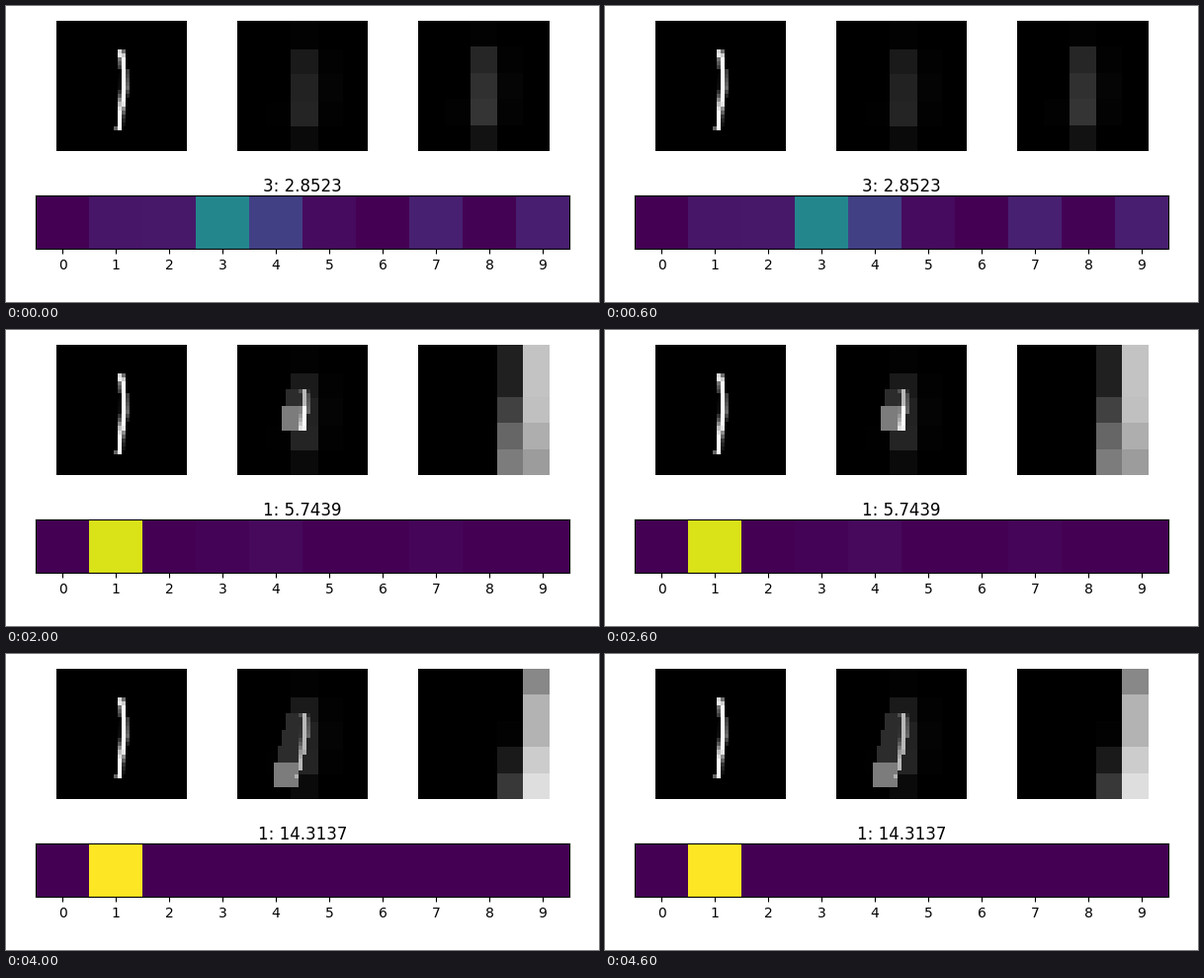
These frames come from a looping animation (600x300 px, 5 s). A matplotlib script:

```python
import numpy as np
import matplotlib.pyplot as plt
from matplotlib.animation import FuncAnimation

W, H = 600, 300
N = 32      # image cells per side
PATCH = 6   # glimpse size in image cells
STEPS = 5

plt.rcParams["font.family"] = "DejaVu Sans"


def stroke():
    """Handwritten one: each cell's brightness is its overlap with the stroke."""
    rows = np.arange(7, 27)
    left = np.interp(rows, [7, 8, 9, 11, 12, 16, 18, 20, 22, 25, 26],
                     [15.16, 15.08, 15.55, 15.75, 16, 15.95, 15.65, 15.25, 15, 15, 14.6])
    right = np.interp(rows, [7, 8, 9, 11, 12, 16, 19, 20, 21, 23, 26],
                      [16.43, 16.8, 17, 17, 17.25, 17.42, 17, 16.9, 16.55, 16.2, 16])
    col = np.arange(N)
    img = np.zeros((N, N))
    cover = np.minimum(right[:, None], col + 1) - np.maximum(left[:, None], col)
    img[rows] = 255 * cover.clip(0, 1)
    return img


def grid(**cols):
    """5x5 patch that is black except for the given columns."""
    out = np.zeros((5, 5))
    for name, values in cols.items():
        out[:, int(name[1])] = values
    return out


def bars(**probs):
    out = np.zeros((1, 10))
    for name, p in probs.items():
        out[0, int(name[1])] = p
    return out


digit = stroke()
overview = grid(c1=[0, 0, 0, 1, 0], c2=[2, 26, 34, 36, 10], c3=[0, 2, 4, 2, 0])
cell = np.arange(N) * 5 // N
backdrop = overview[np.ix_(cell, cell)]

glimpses = [
    grid(c1=[0, 0, 0, 2, 0], c2=[2, 38, 48, 52, 18], c3=[0, 2, 5, 3, 0]),
    grid(c2=[14, 0, 0, 0, 14], c3=252, c4=[36, 42, 50, 70, 64]),
    grid(c3=[32, 32, 66, 102, 124], c4=[196, 196, 192, 174, 156]),
    grid(c3=[18, 18, 30, 44, 50], c4=[154, 152, 180, 212, 204]),
    grid(c3=[0, 0, 2, 26, 56], c4=[136, 180, 180, 204, 222]),
]
beliefs = [
    bars(p1=.06, p2=.063, p3=.46, p4=.19, p5=.03, p7=.088, p8=.004, p9=.083),
    bars(p1=.41, p2=.025, p3=.115, p4=.27, p7=.1, p8=.025, p9=.03),
    bars(p1=.945, p3=.01, p4=.025, p7=.012),
    bars(p1=1),
    bars(p1=1),
]
titles = ["3: 2.8523", "1: 2.7706", "1: 5.7439", "1: 9.6077", "1: 14.3137"]


def window(step):
    """The glimpse slides four rows down and one column left per step."""
    top, left = 7 + 4 * step, 13 - step
    return slice(top, top + PATCH), slice(left, left + PATCH)


def canvas(step):
    out = backdrop.copy()
    for k in range(1, step + 1):
        w = window(k)
        base, gain = (124, 0.52) if k == step else (44, 0.55)
        out[w] = base + gain * digit[w]
    return out.clip(0, 255)


def add_axes(x, y, w, h):
    return fig.add_axes([x / W, 1 - (y + h) / H, w / W, h / H])


def panel(x, data):
    ax = add_axes(x, 15, 132, 132)
    ax.axis("off")
    return ax.imshow(data, cmap="gray", vmin=0, vmax=255,
                     interpolation="nearest", aspect="auto")


fig = plt.figure(figsize=(W / 100, H / 100), dpi=100, facecolor="white")
panel(51, digit)
seen = panel(234, canvas(0))
glimpse = panel(417, glimpses[0])

ax = add_axes(30, 192.3, 540, 54)
belief = ax.imshow(beliefs[0], cmap="viridis", vmin=0, vmax=1,
                   interpolation="nearest", aspect="auto")
ax.set_xticks(range(10))
ax.set_yticks([])
title = ax.set_title(titles[0], fontsize=12, pad=2.4)


def update(step):
    seen.set_data(canvas(step))
    glimpse.set_data(glimpses[step])
    belief.set_data(beliefs[step])
    title.set_text(titles[step])
    return seen, glimpse, belief, title


anim = FuncAnimation(fig, update, frames=STEPS, interval=1000, repeat=True, repeat_delay=0)
plt.show()
```
